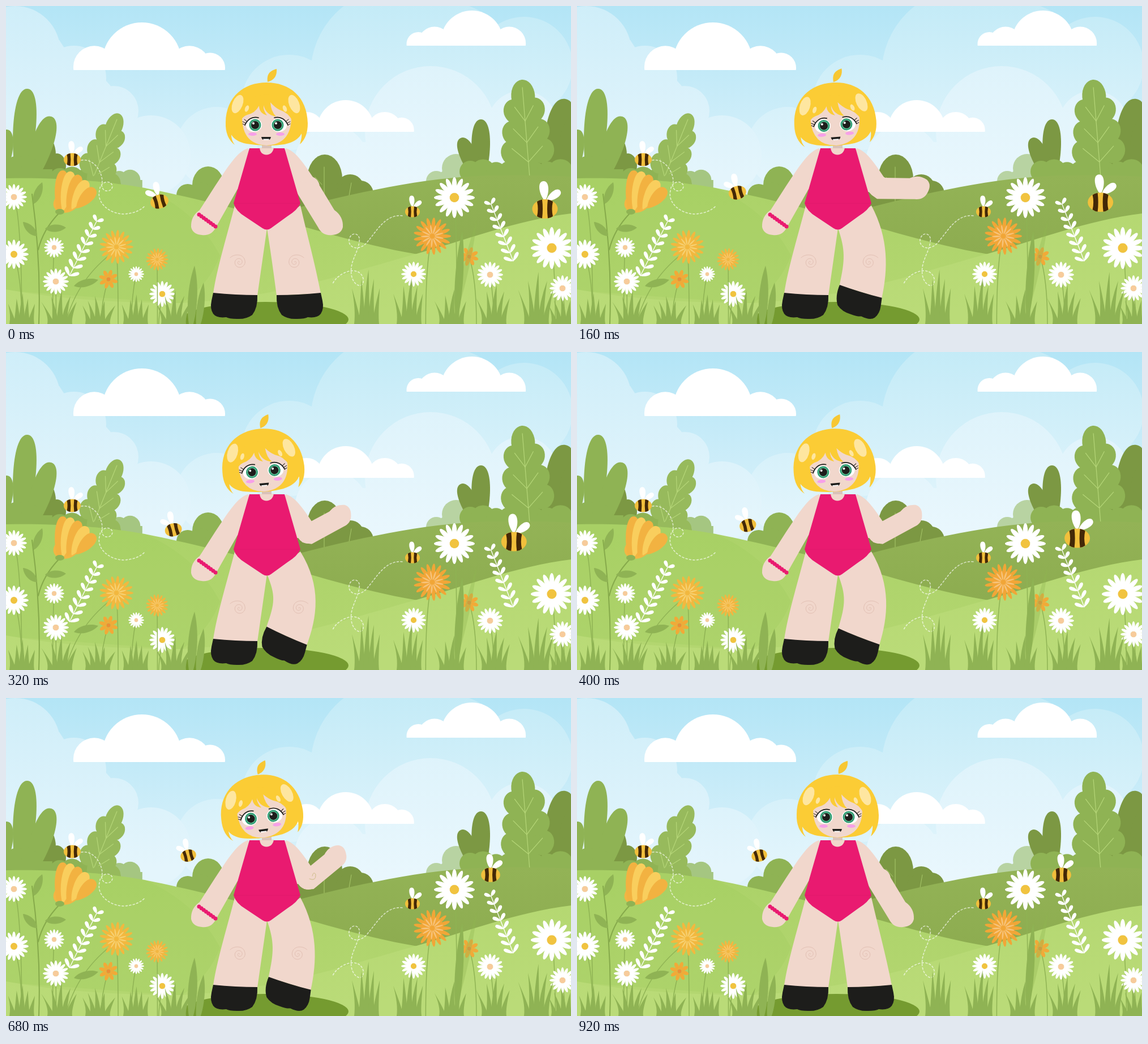
Write an HTML page with a canvas that moves like this. It is 998 by 561 pixels and loops after 960 ms.

```html
<!DOCTYPE html>
<html>
<head>
<meta charset="utf-8">
<title>Meadow wave</title>
<style>
html, body { margin: 0; height: 100%; overflow: hidden; }
canvas { display: block; width: 100vw; height: 100vh; }
</style>
</head>
<body>
<canvas id="stage" width="998" height="561"></canvas>
<script>
const W = 998, H = 561, LOOP = 960, STEP = 40, CUT = 600, TAU = Math.PI * 2;
const stage = document.getElementById('stage').getContext('2d');
const meadow = document.createElement('canvas');
meadow.width = W;
meadow.height = H;
let c = meadow.getContext('2d');

const SKIN = '#f1d7cc', PINK = '#e91a70', HAIR = '#fbcc35', BLACK = '#1d1d1b';
const GREEN = '#8fb354', DARK = '#7c9843', LIGHT = '#b5d678', GOLD = '#f1c340', PALE = '#f7cb9b';
const rad = deg => deg * Math.PI / 180;
const clamp = v => Math.max(0, Math.min(1, v));

function shape(d, fill) {
  c.fillStyle = fill;
  c.fill(new Path2D(d));
}
function line(d, color, width = 1, dash = []) {
  c.strokeStyle = color;
  c.lineWidth = width;
  c.lineCap = 'round';
  c.setLineDash(dash);
  c.stroke(new Path2D(d));
  c.setLineDash([]);
}
function oval(x, y, rx, ry, fill, deg = 0) {
  c.fillStyle = fill;
  c.beginPath();
  c.ellipse(x, y, rx, ry, rad(deg), 0, TAU);
  c.fill();
}
function disc(x, y, r, fill) {
  oval(x, y, r, r, fill);
}
function gradient(y0, y1, from, to) {
  const g = c.createLinearGradient(0, y0, 0, y1);
  g.addColorStop(0, from);
  g.addColorStop(1, to);
  return g;
}
function placed(x, y, deg, draw, sx = 1, sy = sx) {
  c.save();
  c.translate(x, y);
  c.rotate(rad(deg));
  c.scale(sx, sy);
  draw();
  c.restore();
}

// Leaf from base to tip, with a round or a pointed end.
function leaf(x, y, tx, ty, w, fill, round = true) {
  const len = Math.hypot(tx - x, ty - y);
  const [a, b, p, q] = round ? [.3, 1, .6, .8] : [.25, .7, .67, .67];
  placed(x, y, Math.atan2(ty - y, tx - x) * 180 / Math.PI, () => {
    c.fillStyle = fill;
    c.beginPath();
    c.moveTo(0, 0);
    c.bezierCurveTo(len * a, -w * p, len * b, -w * q, len, 0);
    c.bezierCurveTo(len * b, w * q, len * a, w * p, 0, 0);
    c.fill();
  });
}
// Lobed leaf: a broad core, lobe pairs that widen towards the base, light veins.
function oak(x, y, tx, ty, w, fill) {
  const len = Math.hypot(tx - x, ty - y);
  placed(x, y, Math.atan2(ty - y, tx - x) * 180 / Math.PI + 90, () => {
    oval(0, -len * .45, w * .55, len * .47, fill);
    oval(0, -len * .83, w * .5, len * .17, fill);
    for (const k of [.26, .46, .68]) {
      const reach = w * (.8 - k * .6);
      for (const side of [-1, 1]) {
        oval(side * reach, -len * k, w * .47, len * .13, fill, side * 20);
        line(`M0,${-len * k + 18} L${side * reach},${-len * k - 8}`, LIGHT, 1.2);
      }
    }
    line(`M0,0 V${-len * .92}`, LIGHT, 1.2);
  });
}
function hedge(x0, x1, y, r, fill) {
  for (let x = x0, i = 0; x <= x1; x += r * 1.2, i++) disc(x, y, r * (1 + .15 * Math.sin(i * 2)), fill);
  c.fillStyle = fill;
  c.fillRect(x0 - r * .8, y, x1 - x0 + r * 1.6, 45);
}

// A main dome with smaller ones falling away on both sides, cut flat at the base.
function cloud(x, y, r, base, left, right, spread = 1) {
  c.save();
  c.beginPath();
  c.rect(0, 0, W, base);
  c.clip();
  disc(x, y, r, '#fff');
  for (const [side, n] of [[-1, left], [1, right]]) {
    for (let i = 0; i < n; i++) {
      const size = r * (.53 - .15 * i) * spread;
      disc(x + side * r * (1.2 + .52 * i) * spread, base - size * .15, size, '#fff');
    }
  }
  c.restore();
}
function haze(fill, d, ...domes) {
  const p = new Path2D(d);
  for (const [x, y, r] of domes) {
    p.moveTo(x + r, y);
    p.arc(x, y, r, 0, TAU);
  }
  c.fillStyle = fill;
  c.fill(p);
}

function petals(x, y, r, n, fill, width, turn = 0) {
  for (let i = 0; i < n; i++) {
    const a = i / n * TAU + turn;
    oval(x + Math.cos(a) * r * .6, y + Math.sin(a) * r * .6, r * .4, r * width, fill, a * 180 / Math.PI);
  }
}
function stem(x, y) {
  const foot = x + 14 * Math.sin(x);
  line(`M${x},${y} Q${foot},${y + 40} ${foot},561`, GREEN, 1.5);
}
function daisy(x, y, r, heart) {
  stem(x, y);
  petals(x, y, r, 16, '#fff', .12);
  disc(x, y, r * .23, heart);
}
function marigold(x, y, r, outer, inner) {
  stem(x, y);
  disc(x, y, r * .6, outer);
  petals(x, y, r, 17, outer, .1);
  petals(x, y, r * .6, 13, inner, .07, .2);
  disc(x, y, r * .13, outer);
}
function blossom(x, y) {
  stem(x, y);
  petals(x, y, 17, 8, '#f1aa38', .2, .3);
  disc(x, y, 3.5, '#ec8e35');
}
function tulip() {
  oval(107, 346, 24, 18, '#f2b644', -20);
  for (let i = 0; i < 5; i++) {
    leaf(92 + i * 8, 365 - i * 2, 101 + i * 14, 290 + i * i * 2, 21, i % 2 ? '#f9ce5d' : '#f2b241');
  }
  oval(95, 363, 8, 5, GREEN);
}
function sprig(x, y, tx, ty) {
  line(`M${x},${y} L${tx},${ty}`, '#fff', 1.3);
  const a = Math.atan2(ty - y, tx - x);
  for (let i = 0; i < 8; i++) {
    const k = i / 7, px = x + (tx - x) * k, py = y + (ty - y) * k, len = 18 - k * 5;
    for (const side of [-.85, .85]) {
      leaf(px, py, px + Math.cos(a + side) * len, py + Math.sin(a + side) * len, 6, '#fff');
    }
  }
}
// Blades fanning out of one spot, tallest in the middle.
function tuft(x, h) {
  for (let i = -2; i <= 2; i++) {
    const foot = x + i * 8, tip = x + i * 14 + 5 * Math.sin(x + i);
    const top = 561 - h * (1 - Math.abs(i) * .17);
    shape(`M${foot - 6},561 Q${foot - 3},${top + h * .4} ${tip},${top} Q${foot + 4},${top + h * .5} ${foot + 6},561Z`, GREEN);
  }
}

function bee(x, y, s, deg = 0, flip = 1) {
  const stripe = 'M-14,-13 Q-10,-16 -5,-16.5 Q-3,0 -5,16.5 Q-10,16 -14,13 Q-11,0 -14,-13Z';
  placed(x, y, deg, () => {
    leaf(2, -14, 27, -32, 13, '#fff');
    leaf(0, -14, -3, -49, 15, '#fff');
    oval(0, 0, 22.5, 17, '#f1bf3c');
    for (const side of [1, -1]) placed(0, 0, 0, () => shape(stripe, '#432807'), side, 1);
  }, s * flip, s);
}

function drawSky() {
  c.fillStyle = gradient(0, 330, '#b3e5f6', '#dff3fb');
  c.fillRect(0, 0, W, H);
  haze(gradient(0, 300, '#c4ebf7', '#e3f5fc'), 'M620,0 H818 Q850,12 870,36 V300 H600Z',
    [690, 120, 152], [915, 105, 86], [500, 170, 84], [372, 250, 72]);
  haze(gradient(0, 300, '#cfeef9', '#e4f5fc'), 'M0,60 H94 L120,100 L175,130 L220,180 L270,340 H0Z',
    [16, 80, 80], [120, 127, 57], [190, 185, 44], [256, 263, 70]);
  haze(gradient(100, 320, '#def3fb', '#e9f7fd'), 'M575,240 H998 V340 H520Z',
    [750, 222, 116], [912, 212, 63], [575, 275, 65]);
  cloud(240, 99, 70, 113, 1, 2);
  cloud(823, 63, 55, 70, 2, 1);
  cloud(600, 216, 50, 222, 2, 2, 1.15);
}

function drawBushes() {
  hedge(200, 228, 307, 16, '#a5c681');
  oval(70, 262, 18, 32, DARK);
  oval(90, 282, 16, 22, DARK);
  leaf(-8, 310, 2, 218, 26, GREEN);
  leaf(24, 330, 38, 146, 38, GREEN);
  leaf(36, 330, 80, 195, 36, GREEN);
  hedge(-5, 65, 288, 21, GREEN);
  hedge(95, 150, 304, 18, GREEN);
  oak(148, 318, 200, 190, 30, '#97ba5c');
  hedge(165, 190, 312, 16, '#97ba5c');

  oval(357, 316, 28, 33, GREEN);
  hedge(321, 400, 334, 20, GREEN);
  oval(563, 305, 31, 43, DARK);
  oval(608, 321, 24, 24, DARK);
  hedge(530, 642, 331, 20, DARK);
  line('M562,284 V350 M558,315 L546,302 M610,312 L604,346', '#a8c86a');

  disc(795, 286, 25, '#b8d3a2');
  hedge(760, 800, 309, 18, '#b8d3a2');
  leaf(838, 325, 839, 200, 31, DARK);
  leaf(845, 325, 803, 233, 28, DARK);
  leaf(960, 330, 988, 164, 48, DARK);
  leaf(985, 330, 1006, 195, 40, DARK);
  hedge(950, 998, 270, 22, DARK);
  hedge(820, 998, 292, 19, GREEN);
  oak(925, 302, 911, 130, 42, GREEN);
}

function drawHills() {
  shape('M515,356 C640,324 760,299 870,299 Q940,298 998,301 V561 H515Z', gradient(300, 440, '#93b356', '#8dac50'));
  shape('M0,304 C90,302 180,309 245,321 C330,338 390,354 470,374 C550,395 640,425 740,440 V561 H0Z',
    gradient(304, 520, '#abd268', '#b3d670'));
  shape('M0,304 C90,302 180,309 245,321 Q335,360 378,440 Q360,490 310,525 L0,502Z', 'rgba(160,203,94,.3)');
  shape('M998,366 C900,378 810,414 715,440 C600,472 480,515 310,524 Q130,524 0,500 V561 H998Z',
    gradient(366, 540, '#b5d872', '#badb78'));
  oval(458, 553, 147, 31, '#759b30');
}

function drawTrails() {
  const white = 'rgba(255,255,255,.65)', dash = [3, 3.5];
  line('M133,272 C157,268 174,298 169,316 C171,332 189,327 188,317 C184,306 166,309 165,326 C160,348 183,366 207,367 Q232,366 245,353', white, 1.6, dash);
  line('M700,370 C670,367 655,397 640,414 C626,434 604,428 606,412 C610,396 627,401 624,416 C621,438 607,450 610,474 C614,497 634,499 631,481 C624,455 586,470 577,490', white, 1.6, dash);
}

function drawFlowers() {
  line('M58,561 Q62,450 46,332 M57,430 Q65,395 94,365', '#86aa4b', 2);
  leaf(49, 349, 64, 311, 13, GREEN, false);
  leaf(55, 406, 30, 381, 13, GREEN, false);
  leaf(69, 393, 106, 391, 13, GREEN, false);
  leaf(120, 494, 163, 483, 13, GREEN, false);
  tulip();

  daisy(14, 337, 23, PALE);
  daisy(14, 438, 26, GOLD);
  daisy(85, 426, 18, PALE);
  daisy(88, 486, 23, PALE);
  daisy(230, 473, 14, PALE);
  daisy(276, 508, 23, GOLD);
  daisy(720, 473, 22, GOLD);
  daisy(792, 338, 36, GOLD);
  daisy(855, 474, 23, PALE);
  daisy(964, 427, 37, GOLD);
  daisy(983, 498, 23, PALE);
  line('M195,430 Q125,480 105,561', GREEN, 1.5);
  marigold(195, 425, 30, '#f2b83f', '#f7d071');
  marigold(267, 447, 20, '#f2b641', '#f7ca6e');
  marigold(753, 406, 33, '#f1a637', '#f7c279');
  blossom(181, 482);
  blossom(818, 442);
  sprig(112, 476, 160, 380);
  sprig(896, 450, 857, 350);
}

function drawGrass() {
  leaf(795, 561, 806, 397, 14, GREEN, false);
  leaf(790, 561, 832, 377, 10, 'rgba(143,180,82,.35)', false);
  for (let i = 0; i < 5; i++) tuft(28 + i * 67, 54 + 6 * Math.sin(i * 2));
  leaf(326, 575, 333, 458, 16, GREEN, false);
  leaf(338, 575, 349, 488, 13, GREEN, false);
  for (let i = 0; i < 5; i++) tuft(637 + i * 75, 78 + 18 * Math.cos(i * 1.4));
  tuft(985, 50);
}

function drawMeadow() {
  drawSky();
  drawBushes();
  drawHills();
  drawTrails();
  drawFlowers();
  drawGrass();
  bee(117, 271, .67);
  bee(718, 363, .58);
}

function spiral(x, y, flip = 1) {
  placed(x, y, 0, () => {
    let d = 'M0,0';
    for (let a = 0; a < TAU * 2; a += .3) d += `L${Math.cos(a) * a * .82},${-Math.sin(a) * a * .82}`;
    line(d + 'L10.3,0 C10,-15 -8,-16 -16,-8', '#dfbdb0', .9);
  }, flip, 1);
}
const ARM = 'M428,251 C410,256 397,276 369,318 L342,360 Q326,371 327,390 Q330,403 346,404 Q363,406 371,390 L409,323 L432,270Z';
const FOREARM = 'M-20,-5 L-18,-12 L20,-3 L46,40 Q62,51 61,70 Q58,83 42,84 Q25,86 17,70 L-21,8Z';
const BOOT = 'M366,506 Q406,510 444,510 Q445,532 435,545 Q424,553 408,552 Q394,552 389,549 Q372,551 366,543 Q360,534 363,520Z';

function drawArms(bend) {
  shape(ARM, SKIN);
  for (let i = 0; i < 8; i++) disc(341 + i * 4.15, 368 + i * 3, 3.5, PINK);
  shape('M494,251 C512,256 525,276 553,318 L548,333 L514,328 L488,268Z', SKIN);
  oval(534, 319, 20, 19, SKIN);
  placed(534, 320, bend, () => shape(FOREARM, SKIN), 1 + bend / 700);
}

function drawLegs(bend) {
  shape('M404,352 C392,400 373,460 366,507 Q406,512 444,511 L461,392Z', SKIN);
  shape(BOOT, BLACK);
  spiral(412, 452);
  const kneeX = 517 - bend * .05, kneeY = 465 - bend * .1;
  const cos = Math.cos(rad(bend)), sin = Math.sin(rad(bend));
  const shin = (x, y) => [kneeX + x * cos - y * sin, kneeY + x * sin + y * cos];
  shape(`M520,352 C${531 + bend},${400 + bend * .5} ${shin(29 + bend * .15, -10)} ${shin(39, 42)}
    L${shin(-39, 46)} C${shin(-45, 0)} ${467 + bend * .35},430 461,392Z`, SKIN);
  placed(kneeX, kneeY, bend, () => placed(405, -465, 0, () => shape(BOOT, BLACK), -1, 1));
  spiral(510 + bend * .28, 452, -1);
}

function drawBody() {
  shape('M430,251 H492 L520,348 Q515,360 497,371 L468,392 Q461,397 453,392 L423,372 Q406,362 402,348Z', PINK);
  line('M403,348 H519', 'rgba(190,20,90,.3)', .7);
  shape('M448,250 Q449,262 460,262.5 Q471,262 473,250Z', SKIN);
  shape('M452,240 H469 V251 H452Z', '#dac2b9');
}

function drawEye(x, side) {
  placed(x, 210, 0, () => {
    oval(-2, 0, 14, 12, '#fff');
    disc(0, 0, 10.5, '#2e9b71');
    disc(0, 0, 8.3, '#65bf99');
    disc(0, 0, 7, BLACK);
    line('M-18,0 C-14,-9 -6,-16 6,-13', BLACK, 1.7);
    line('M-16,-3 L-22,-6 M-14,-6 L-19,-10 M-18,0 L-22,-2', BLACK);
  }, side, 1);
  disc(x - 3, 207, 2, '#fff');
  oval(x - side * 4.5, 226, 7.5, 3, '#f7a0e8');
}

function drawHead() {
  shape('M462,134 C460,119 467,114 478,111 C479,121 475,131 462,134Z', '#f7c733');
  shape('M388,205 C389,160 420,135 460,135 C501,135 532,160 533,207 Q533,232 519,244 Q523,232 522,225 Q515,239 492,244 Q460,249 425,243 Q405,239 398,227 Q398,237 404,245 Q387,232 388,205Z', HAIR);
  shape('M417,198 Q420,168 460,167 Q501,168 504,198 Q503,244 460,246 Q418,244 417,198Z', SKIN);
  drawEye(440, 1);
  drawEye(480, -1);
  shape('M451,231 H468 Q467,236 464,236 H455 Q452,236 451,231Z', BLACK);
  shape('M454,234.5 H465 L464,236.5 H455Z', '#fff');
  shape('M414,203 Q408,161 458,156 Q509,159 506,203 Q499,188 483,183 Q475,179 467,170 Q468,186 477,195 Q459,192 455,175 Q454,184 461,193 Q447,189 447,176 Q440,189 426,192 Q418,195 414,203Z', HAIR);
  for (const [x, side] of [[409, 1], [509, -1]]) {
    oval(x, 173, 9, 17, '#fee6a0', 22 * side);
    oval(x + 16.5 * side, 181, 3.3, 6, '#fee6a0', 22 * side);
  }
}

function drawBees(t) {
  if (t < CUT) {
    bee(271 + t * .077, 345 - t * .098, .72 - t * .00015, -15, -1);
    bee(952 - t * .171, 358 - t * .0735, 1);
  } else {
    bee(322, 278, .62, -15, -1);
    bee(856, 312, .75);
  }
}

function frame() {
  const t = Math.floor(performance.now() % LOOP / STEP) * STEP;
  const raise = Math.min(clamp(t / 240), clamp((920 - t) / 240));
  const relax = clamp((t - 240) / 280);
  const second = t >= CUT;
  c.drawImage(meadow, 0, 0);
  drawArms(raise * (second ? -98 : -87));
  drawLegs(raise * (30 - 10 * relax));
  drawBody();
  if (t >= 480 && raise === 1) line('M536,319 Q548,324 547,311 Q543,305 541,314', '#c9b980', .9);
  const tilt = raise * (second ? -7.3 : -5.7 + 1.3 * relax);
  placed(460, 270, tilt, () => placed(-460, -270, 0, drawHead));
  drawBees(t);
  requestAnimationFrame(frame);
}

drawMeadow();
c = stage;
frame();
</script>
</body>
</html>
```
